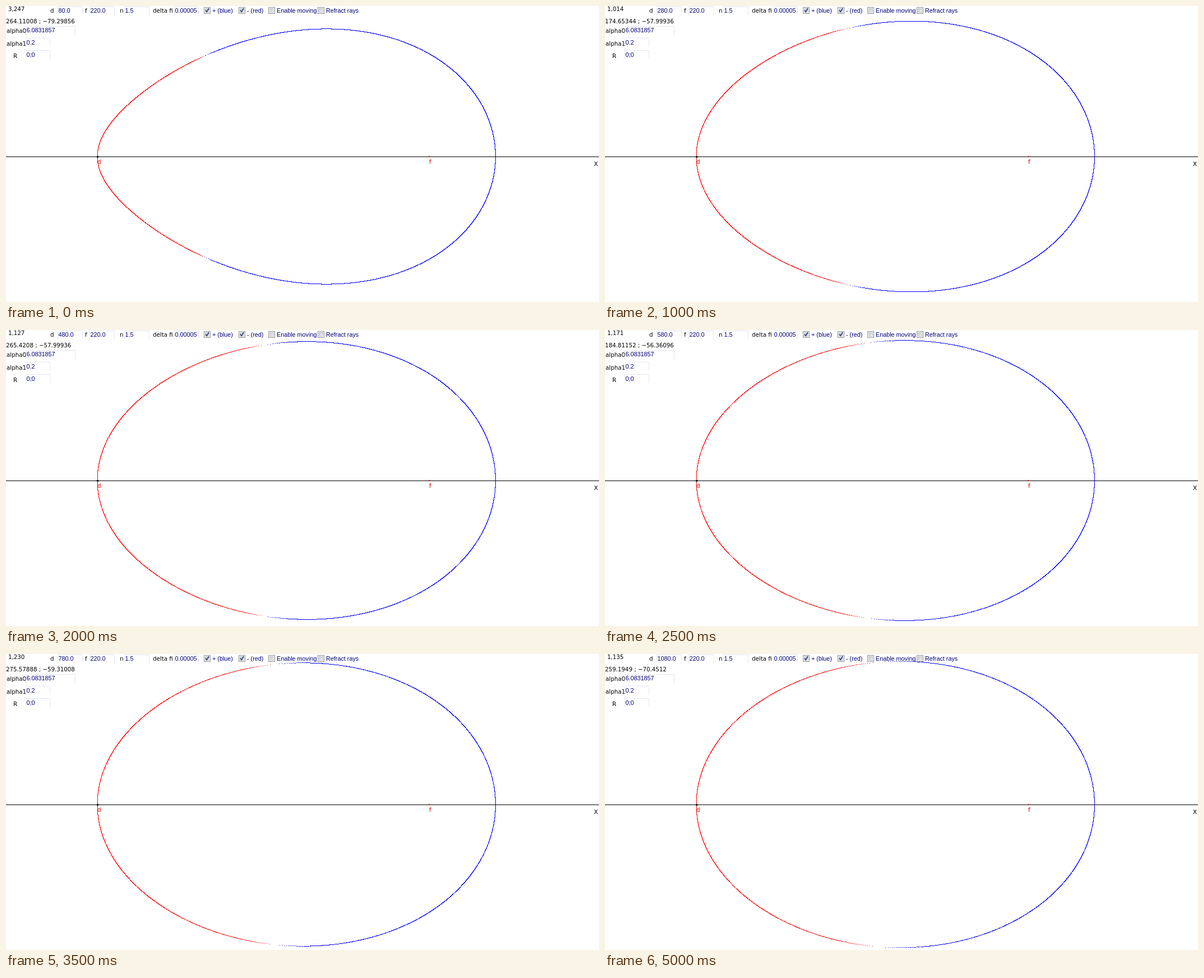
An HTML page with a canvas that plays this animation: 1058 by 529 pixels, repeating every 5500 ms.

```html
<!DOCTYPE html>
<html lang="en">
<head>
<meta charset="utf-8">
<title>Cartesian oval</title>
<style>
  html, body { margin: 0; width: 100%; height: 100%; overflow: hidden; background: #fff; }
  canvas, svg { position: absolute; left: 0; top: 0; display: block; }
  text { font: 10.25px "DejaVu Sans", sans-serif; fill: #000; white-space: pre; }
  .control { font: 10.8px "Liberation Sans", Arial, sans-serif; fill: #000078; }
  .mark { fill: #e00000; }
</style>
</head>
<body>
<canvas id="plot" width="1058" height="529"></canvas>
<svg id="panel" width="1058" height="529" viewBox="0 0 1058 529">
  <defs>
    <linearGradient id="well" x2="1" y2="1">
      <stop offset="0" stop-color="#c4c8ce"/>
      <stop offset="1" stop-color="#f4f4f6"/>
    </linearGradient>
  </defs>
</svg>
<script>
const STEP_MS = 500, STEPS = 11;
const F = 220, N = 1.5;
const VERTEX = { x: 163, y: 269 }, SCALE = 592 / F;
// Single-precision rounding of the 0.00005 step for angles between 4 and 8
const DELTA = 105 / 2 ** 21, ALPHA0 = 6.0831857;

const readouts = [
  ['3,247', '264.11008 ; −79.29856'],
  ['0,866', '261.48865 ; −67.1744'],
  ['1,014', '174.65344 ; −57.99936'],
  ['1,073', '284.42624 ; −58.98240'],
  ['1,127', '265.4208 ; −57.99936'],
  ['1,171', '184.81152 ; −56.36096'],
  ['1,214', '292.94592 ; −54.39488'],
  ['1,230', '275.57888 ; −59.31008'],
  ['1,245', '254.93504 ; −63.8976'],
  ['1,190', '262.79936 ; −67.1744'],
  ['1,135', '259.1949 ; −70.4512'],
];

const panel = document.getElementById('panel');
const ctx = document.getElementById('plot').getContext('2d');

function add(tag, attrs, content = '') {
  const node = document.createElementNS(panel.namespaceURI, tag);
  for (const key in attrs) node.setAttribute(key, attrs[key]);
  node.textContent = content;
  return panel.appendChild(node);
}

const label = (x, y, content, cls = '') => add('text', { x, y, class: cls }, content);

function field(x, y, width, baseline, content) {
  add('path', {
    d: `M${x + .5} ${y + 16}V${y + .5}H${x + width + .5}V${y + 16}`,
    fill: 'none', stroke: '#e4e4f6',
  });
  return label(x + 1.5, baseline, content, 'control');
}

function checkbox(x, content, checked) {
  add('rect', { x: x + .5, y: 2.5, width: 11, height: 11, fill: '#fff', stroke: '#8e8f8f' });
  add('rect', { x: x + 2.5, y: 4.5, width: 7, height: 7, fill: 'url(#well)', stroke: '#c2c5ca' });
  if (checked) {
    add('path', {
      d: `M${x + 3} 7.5L${x + 5.3} 10.5L${x + 9} 4`,
      fill: 'none', stroke: '#35457f', 'stroke-width': 1.8,
    });
  }
  label(x + 15, 12, content, 'control');
}

const rate = label(4, 9, '');
const pointer = label(0, 31, '');

label(79, 12, 'd');
const distance = field(92, 1, 44, 12, '');
label(141, 12, 'f');
field(149, 1, 44, 12, '220.0');
label(203, 12, 'n');
field(211, 1, 44, 12, '1.5');
label(262, 12, 'delta fi');
field(300, 1, 43, 12, '0.00005');

label(1, 47.5, 'alpha0');
field(35, 36, 88, 47, '6.0831857');
label(1, 70.5, 'alpha1');
field(35, 57, 43, 69, '0.2');
label(13, 92.5, 'R');
field(35, 79, 43, 91, '0;0');

checkbox(353, '+ (blue)', true);
checkbox(415, '- (red)', true);
checkbox(468, 'Enable moving', false);
checkbox(556, 'Refract rays', false);

label(163, 282, 'd', 'mark');
label(755, 282, 'f', 'mark');
label(1049, 286, 'X');

function box(color, x, y, w, h) {
  ctx.fillStyle = color;
  ctx.fillRect(x, y, w, h);
}

// Far (blue) and near (red) crossing of each ray with r1 + N * r2 = d + N * F
function drawOval(d) {
  const span = d + F, path = d + N * F, a = N * N - 1;
  const c = a * (N * N * span * span - path * path);
  const limit = Math.acos((Math.sqrt(c) + path) / (N * N * span));
  const base = ALPHA0 - 2 * Math.PI;
  const first = Math.ceil((-limit - base) / DELTA);
  const last = Math.floor((limit - base) / DELTA);

  for (const [sign, color] of [[1, '#00f'], [-1, '#f00']]) {
    ctx.fillStyle = color;
    for (let k = first; k <= last; k++) {
      const phi = base + k * DELTA;
      const b = N * N * span * Math.cos(phi) - path;
      const r = (b + sign * Math.sqrt(Math.max(0, b * b - c))) / a;
      const x = VERTEX.x + (r * Math.cos(phi) - d) * SCALE;
      const y = VERTEX.y + r * Math.sin(phi) * SCALE;
      ctx.fillRect(Math.floor(x + 1e-6), Math.floor(y), 1, 1);
    }
  }
}

function render(step) {
  const d = 80 + 100 * step;
  [rate.textContent, pointer.textContent] = readouts[step];
  distance.textContent = d.toFixed(1);
  ctx.clearRect(0, 0, 1058, 529);
  drawOval(d);
  box('#000', 0, VERTEX.y, 1058, 1);
  box('#000', VERTEX.x - 1, VERTEX.y - 1, 3, 3);
  box('#e00000', 754, VERTEX.y - 1, 2, 2);
}

let shown = -1;
function tick() {
  const step = Math.floor(performance.now() / STEP_MS) % STEPS;
  if (step !== shown) render(shown = step);
  requestAnimationFrame(tick);
}
tick();
</script>
</body>
</html>
```
